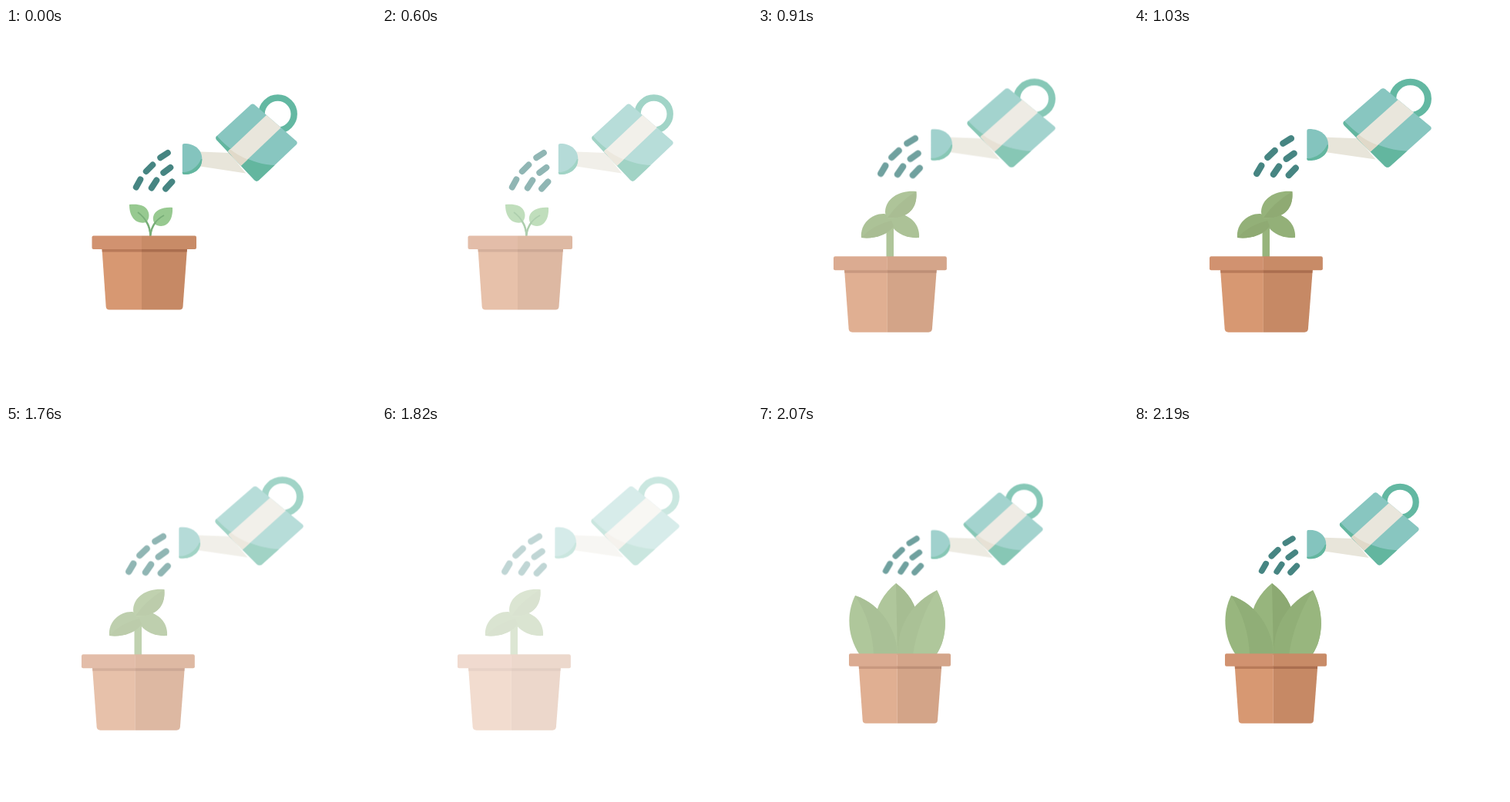
An HTML page that plays this animation: 480x480 px, repeating every 2860 ms.

```html
<!DOCTYPE html>
<html lang="en">
<head>
<meta charset="utf-8">
<title>Growing plant</title>
<style>
  html, body { margin: 0; width: 100%; height: 100%; overflow: hidden; background: #fff; }
  svg { display: block; width: 100vw; height: 100vh; }
  .scene { visibility: hidden; }
  .drops { stroke: #468582; stroke-width: 8; stroke-linecap: round; }
</style>
</head>
<body>
<svg viewBox="0 0 480 480">
  <defs>
    <clipPath id="body"><path d="M317.5 99.5Q320 97.5 322.5 99.5L376.5 146.5Q379 149 376.5 151.5L328 197.5Q325 200 322 197L273.5 145.5Q271 142.5 273.5 140Z"/></clipPath>
    <clipPath id="rose"><path d="M228.8 152Q228.8 150 231.3 150C245.3 150 254.3 158 254.3 170S245.3 190 231.3 190Q228.8 190 228.8 188Z"/></clipPath>
    <clipPath id="tub"><path d="M124.5 286H235L229.5 361.5Q229.2 365.5 225.2 365.5H134Q130 365.5 129.7 361.5Z"/></clipPath>
    <clipPath id="rim"><rect x="111.5" y="269.5" width="135.5" height="17.5" rx="2"/></clipPath>

    <g id="can">
      <circle cx="352.6" cy="111.6" r="21.1" fill="none" stroke="#63b8a2" stroke-width="8.4"/>
      <path d="M252 160.5L290 162L311 188.5L252 179.5Z" fill="#e8e5da"/>
      <g clip-path="url(#body)">
        <path d="M265 80H385V205H265Z" fill="#88c6c0"/>
        <path d="M268 133C287 158 315 177 350 178L325 205L265 145Z" fill="#63b69f"/>
        <path d="M340 111L357 129L304 179.5L288 160Z" fill="#e9e6dc"/>
        <path d="M290.5 157Q300 165 313.5 170.5L304 179.5L288 160Z" fill="#e0d9c9"/>
      </g>
      <g clip-path="url(#rose)">
        <path d="M228 149H256V191H228Z" fill="#84c4be"/>
        <path d="M228 187C239 188 249 180 253 170H258V192H228Z" fill="#63b69f"/>
      </g>
      <path class="drops" d="M200.3 168.2L209.8 162M181.8 186L190.3 177.5M204.3 187.8L213.3 181M168.8 206.5L174.3 196.5M188.8 207.5L195.3 197.5M207.1 208.5L215.3 199.5"/>
    </g>

    <g id="pot">
      <g clip-path="url(#tub)">
        <path d="M120 286H176V366H120Z" fill="#d79872"/>
        <path d="M176 286H240V366H176Z" fill="#c68965"/>
        <path d="M120 286H176V290.5H120Z" fill="#b87a59"/>
        <path d="M176 286H240V290.5H176Z" fill="#aa6e4f"/>
      </g>
      <g clip-path="url(#rim)">
        <path d="M111 269H176V288H111Z" fill="#d19270"/>
        <path d="M176 269H248V288H176Z" fill="#c88b67"/>
      </g>
    </g>
  </defs>

  <g class="scene">
    <use href="#can"/>
    <path d="M160 229C170 228 180 229 184 237C187 243 185 249 182 252C171 255 160 248 160 229Z
             M216 233C204 232 193 236 191 245C190 250 193 255 196 256C208 260 217 250 216 233Z" fill="#97c990"/>
    <path d="M187.3 270C187 258 183 248 171 239M187.3 270C188 257 194 249 205 243" fill="none" stroke="#78ae78" stroke-width="1.7"/>
    <path d="M187.3 270C187.3 262 185.8 257 182 251M187.3 270C188 262 190 257 194 252" fill="none" stroke="#78ae78" stroke-width="2.4"/>
    <use href="#pot"/>
  </g>

  <g class="scene">
    <use href="#can" transform="translate(-23.7 -22.6) scale(1.084 1.024)"/>
    <path d="M166.5 250H176V298H166.5Z" fill="#97b47c"/>
    <path d="M134 272C132 253 149 240 164 241L178 246L176 257C167 270 148 274 134 272Z" fill="#93b078"/>
    <path d="M209 272C210 256 200 246 188 242L172 246L175 259C182 268 195 273 209 272Z" fill="#93b078"/>
    <path d="M205.3 212C185 210 166 220 165 238C165 243 167 246 170 248L180 246C199 243 207 230 205.3 212Z" fill="#96b37b"/>
    <path d="M205.3 212C207 230 199 243 180 246L168 246Q182 226 205.3 212Z
             M134 272C148 274 167 270 176 257L173 250Q150 255 134 272Z" fill="#8faa73"/>
    <use href="#pot" transform="translate(-22.9 20.4) scale(1.084 1.024)"/>
  </g>

  <g class="scene">
    <use href="#can" transform="translate(1 -6.5) scale(.976 .942)"/>
    <path d="M179 204C163 217 153 234 152 252L181 296L207 252C206 232 195 216 179 204Z" fill="#97b57d"/>
    <path d="M179 204C195 216 206 232 207 252L181 296Z" fill="#8ca972"/>
    <path d="M126 220C115 242 115 272 132 297H181C181 266 160 231 126 220Z" fill="#98b67e"/>
    <path d="M126 220C160 231 181 266 181 297H150C149 269 141 243 126 220Z" fill="#90ae77"/>
    <path d="M232 213C202 228 181 255 181 297H231C247 274 246 239 232 213Z" fill="#91af77"/>
    <path d="M232 213C246 239 247 274 231 297H201C205 268 216 239 232 213Z" fill="#98b67e"/>
    <use href="#pot" transform="translate(9.4 41) scale(.974 .943)"/>
  </g>
</svg>
<script>
  const LOOP = 2860;
  const scenes = [...document.querySelectorAll('.scene')];

  // Dip through white: [delay, scene offset, opacity]
  const dip = [
    [0, 0, .6], [60, 0, .34], [120, 0, .12],
    [190, 1, .36], [250, 1, .58], [310, 1, .77], [370, 1, .92], [430, 1, 1]
  ];
  const steps = [[0, 0, 1]];
  [600, 1760].forEach((start, i) =>
    dip.forEach(([delay, next, alpha]) => steps.push([start + delay, i + next, alpha])));

  function draw() {
    const t = performance.now() % LOOP;
    const [, shown, alpha] = steps.findLast(step => step[0] <= t);
    scenes.forEach((scene, i) => {
      scene.style.visibility = i === shown ? 'visible' : 'hidden';
      scene.style.opacity = alpha;
    });
    requestAnimationFrame(draw);
  }
  draw();
</script>
</body>
</html>
```
